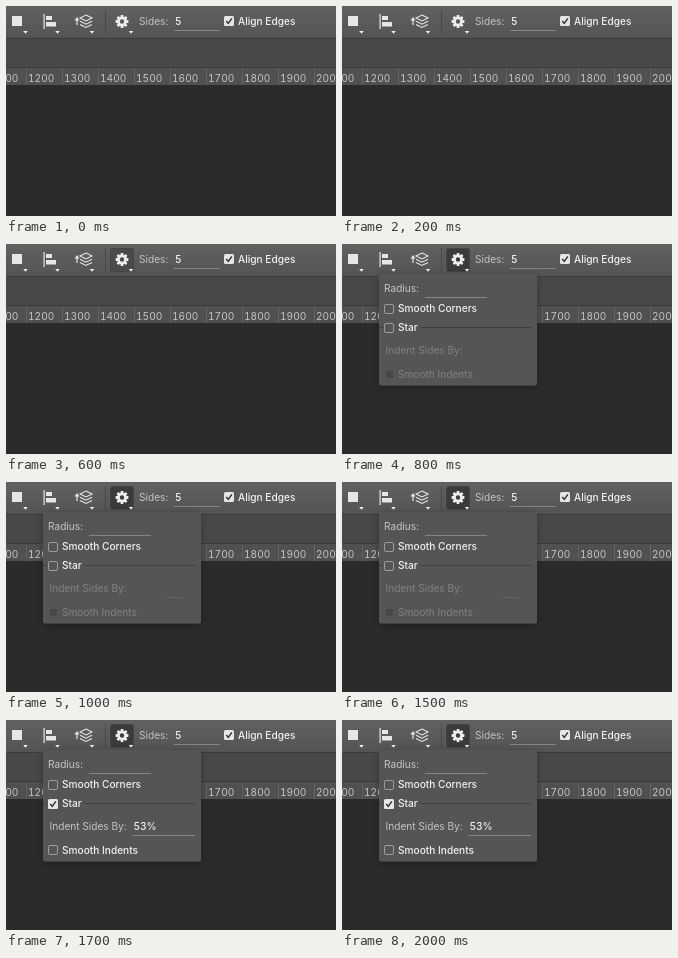
Animation, 330 px wide and 210 px high, one loop 2.8 s. Source, as an HTML page:

```html
<!DOCTYPE html>
<html lang="en">
<head>
<meta charset="utf-8">
<title>Polygon options</title>
<style>
  html, body { margin: 0; width: 100%; height: 100%; overflow: hidden; background: #2b2b2b; }
  svg { display: block; width: 330px; height: 210px; }
  text { font: 10.15px Inter, Roboto, sans-serif; fill: #c4c4c4; font-variant-numeric: tabular-nums; }
  .strong { font-weight: 500; fill: #f2f2f2; }
  .field { stroke: #858585; }
  .disabled text { fill: #808080; font-weight: 400; }
</style>
</head>
<body>
<svg viewBox="0 0 330 210">
  <defs>
    <linearGradient id="barFill" x2="0" y2="1">
      <stop stop-color="#616161"/><stop offset="1" stop-color="#545454"/>
    </linearGradient>
    <filter id="shadow" x="-10%" y="-15%" width="120%" height="130%">
      <feDropShadow dx="0" dy="2" stdDeviation="4" flood-color="#000" flood-opacity=".3"/>
    </filter>
    <path id="caret" d="M-2.3 0H2.3L0 2.8Z" fill="#eee"/>
    <rect id="box" x=".5" y=".5" width="9" height="9" rx="1.5" fill="none" stroke="#9c9c9c"/>
    <g id="checked">
      <rect width="10" height="10" rx="1.5" fill="#e6e6e6"/>
      <path d="M2.2 5 4.3 7.4 7.8 2.4" fill="none" stroke="#333" stroke-width="1.5"/>
    </g>
  </defs>

  <rect width="330" height="210" fill="#2b2b2b"/>
  <rect y="33" width="330" height="29" fill="#484848"/>
  <rect y="62" width="330" height="17" fill="#505050"/>
  <path d="M0 61.5H330" stroke="#3b3b3b"/>
  <g id="ruler"></g>
  <rect width="330" height="32" fill="url(#barFill)"/>
  <path d="M0 32.5H330" stroke="#3b3b3b"/>

  <g fill="#e6e6e6">
    <rect x="6" y="10" width="10" height="10"/>
    <path d="M37.5 8h1.2v15h-1.2zM40 10h6v4h-6zM40 16h10v4.5H40z"/>
    <path d="M71 11l2.5 3.4h-1.9V19h-1.2v-4.6h-1.9z"/>
    <path d="M80 9l6 3-6 3-6-3zM74 15.2l6 3 6-3M74 18.4l6 3 6-3" fill="none" stroke="#e6e6e6" stroke-width="1.1"/>
  </g>
  <path d="M99.5 4V28" stroke="#484848"/>
  <rect id="hover" x="104.5" y="4.5" width="23" height="23" rx="2" stroke="#444"/>
  <g id="gear" transform="translate(116 15.5)" fill="#eee"></g>
  <use href="#caret" x="19.5" y="25"/>
  <use href="#caret" x="51.5" y="25"/>
  <use href="#caret" x="86" y="25"/>
  <use href="#caret" x="125" y="25"/>
  <text x="133" y="19">Sides:</text>
  <text class="strong" x="169" y="19">5</text>
  <path class="field" d="M168 24.5H214"/>
  <use href="#checked" x="218" y="10"/>
  <text class="strong" x="232" y="19">Align Edges</text>

  <g id="popup">
    <rect x="37" y="30" width="158" height="111.5" rx="2" fill="#545454" filter="url(#shadow)"/>
    <text x="42" y="48">Radius:</text>
    <path class="field" d="M83 53.5H145"/>
    <use href="#box" x="42" y="60"/>
    <text class="strong" x="56" y="68">Smooth Corners</text>
    <path d="M37 83.5H41M78 83.5H190" stroke="#414141"/>
    <use href="#box" x="42" y="79"/>
    <use id="starCheck" href="#checked" x="42" y="79"/>
    <text class="strong" x="56" y="87">Star</text>
    <g id="indent">
      <text x="43.5" y="110">Indent Sides By:</text>
      <text class="strong" x="56" y="134">Smooth Indents</text>
    </g>
    <g id="indentOff">
      <path id="faintField" d="M160 115.5H176" stroke="#666"/>
      <rect x="44" y="127" width="7" height="7" rx="1" fill="#474747"/>
    </g>
    <g id="indentOn">
      <text class="strong" x="127.5" y="110">53%</text>
      <path class="field" d="M126 115.5H189"/>
      <use href="#box" x="42" y="125"/>
    </g>
  </g>
</svg>
<script>
const LOOP = 2800;
const $ = id => document.getElementById(id);
const show = (id, visible) => $(id).style.display = visible ? '' : 'none';

let ruler = '';
for (let value = 1100, x = -15.5; value <= 2000; value += 100, x += 36) {
  ruler += `<path d="M${x} 63V79" stroke="#646464"/><text x="${x + 1.5}" y="76">${value}</text>`;
}
$('ruler').innerHTML = ruler;

let teeth = '';
for (let angle = 0; angle < 360; angle += 45) {
  teeth += `<rect x="-1.4" y="-6.4" width="2.8" height="3" rx=".5" transform="rotate(${angle})"/>`;
}
$('gear').innerHTML = teeth + '<circle r="3.5" fill="none" stroke="#eee" stroke-width="2.6"/>';

function draw(t) {
  const star = t >= 1600;
  show('hover', t >= 500);
  $('hover').style.opacity = t < 600 ? 0.5 : 1;
  $('hover').setAttribute('fill', t < 800 ? '#4a4a4a' : '#3b3b3b');
  show('popup', t >= 800);
  show('faintField', t >= 900);
  show('starCheck', star);
  show('indentOn', star);
  show('indentOff', !star);
  $('indent').setAttribute('class', star ? '' : 'disabled');
}

function tick() {
  draw(performance.now() % LOOP);
  requestAnimationFrame(tick);
}
tick();
</script>
</body>
</html>
```
